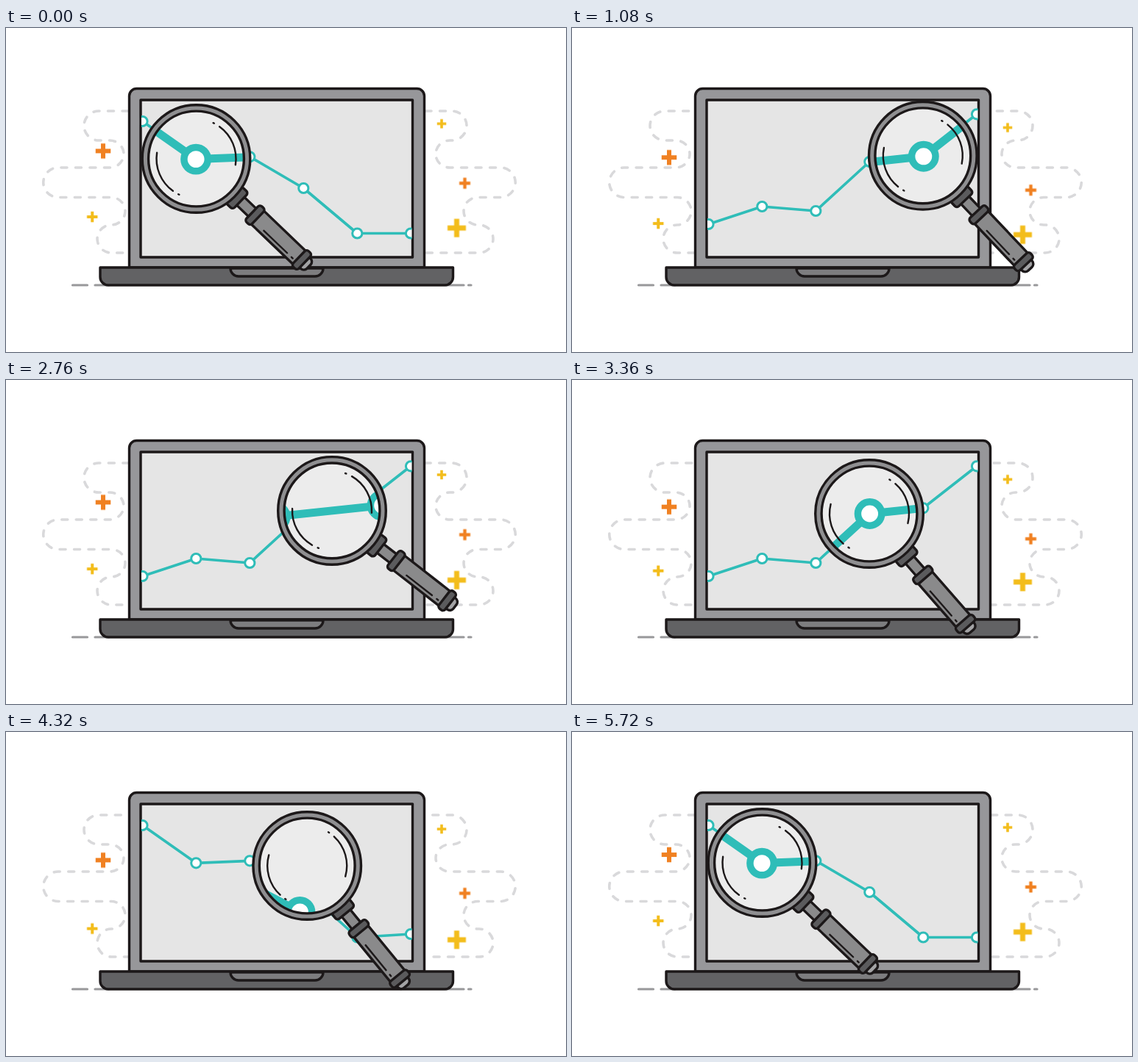
An HTML page that plays this animation: 761x441 px, repeating every 5.76 s.

```html
<!DOCTYPE html>
<html lang="en">
<head>
<meta charset="utf-8">
<title>Chart under a magnifier</title>
<style>
  html, body { margin: 0; width: 100%; height: 100%; overflow: hidden; background: #fff; }
  svg { display: block; width: 761px; height: 441px; }
  .ink { stroke: #1c1819; stroke-width: 3.4; stroke-linejoin: round; stroke-linecap: round; }
  .line { fill: none; }
  .trail { fill: none; stroke: #d9d9db; stroke-width: 3.6; stroke-linecap: round;
    stroke-dasharray: 8 11.5; animation: march 2880ms linear infinite; }
  .plus { animation: bob 1440ms cubic-bezier(.37, 0, .63, 1) infinite alternate; }
  .orange { stroke: #f08122; }
  .yellow { stroke: #f3bd1c; }
  .graph { stroke: #2fbdb8; stroke-width: 3.7; fill: none; stroke-linejoin: round; }
  .graph circle { fill: #fff; stroke-width: 3; }
  #zoom { stroke-width: 11; }
  #zoom circle { stroke-width: 9.5; }
  .metal { fill: #8a8a8b; }
  .collar { fill: #5b5b5d; }
  .thin { stroke-width: 2.4; }
  @keyframes march { to { stroke-dashoffset: -19.5; } }
  @keyframes bob { from { transform: translateY(-5.3px); } to { transform: translateY(5.3px); } }
</style>
</head>
<body>
<svg viewBox="0 0 761 441">
  <defs>
    <clipPath id="screenClip"><rect x="184" y="99" width="367.5" height="212"/></clipPath>
    <clipPath id="glassClip"><circle r="65"/></clipPath>
  </defs>

  <path class="trail" d="M166 113H126a20 20 0 0 0 0 40H141a19 18.5 0 0 1 0 37H71a20 20 0 0 0 0 40.5H143a19 18.75 0 0 1 0 37.5a19 19 0 0 0 0 38H166"/>
  <path class="trail" d="M570 113H606a20 20 0 0 1 0 40H603a19 18.5 0 0 0 0 37H672a20 20 0 0 1 0 40.5H641a19 18.75 0 0 0 0 37.5H643a19 19 0 0 1 0 38H570"/>
  <g id="pluses"></g>

  <!-- laptop -->
  <path d="M90.500 350H110.500M121 350H140M598 350H622M628.500 350H632" fill="none" stroke="#98989a" stroke-width="3.2" stroke-linecap="round"/>
  <path class="ink" fill="#97979a" d="M167.500 326V92.500a10 10 0 0 1 10-10H558.500a10 10 0 0 1 10 10V326z"/>
  <rect class="ink" x="183" y="98" width="369.500" height="214" fill="#e5e5e5"/>
  <path class="ink" fill="#626264" d="M128 326H607.500V339a11 11 0 0 1-11 11H139a11 11 0 0 1-11-11z"/>
  <path class="ink" fill="#7d7d7f" d="M305 327a11 11 0 0 0 11 11H420a11 11 0 0 0 11-11z"/>

  <g class="graph" id="chart" clip-path="url(#screenClip)"></g>

  <g id="lens">
    <g id="handle">
      <rect class="ink metal" x="80" y="-7.500" width="30" height="15"/>
      <rect class="ink collar" x="70" y="-15.500" width="13.500" height="31" rx="4"/>
      <path class="ink" fill="#a3a3a5" d="M203 -9.500H206a6 6 0 0 1 6 6V3.500a6 6 0 0 1-6 6H203z"/>
      <rect class="ink metal" x="114" y="-12.500" width="82" height="25"/>
      <rect class="ink collar" x="105.500" y="-15" width="10.500" height="30" rx="4"/>
      <rect class="ink collar" x="193.500" y="-15" width="10.500" height="30" rx="4"/>
      <path class="ink line thin" d="M134 7H178M186 7H188.500"/>
    </g>
    <circle r="65" fill="#ececec"/>
    <g class="graph" id="zoom" clip-path="url(#glassClip)"></g>
    <g id="glare"></g>
    <circle r="69" fill="none" stroke="#8f8f91" stroke-width="9"/>
    <circle class="ink line" r="73.300"/>
    <circle class="ink line" r="64.900"/>
  </g>
</svg>

<script>
const LOOP = 5760;
const $ = id => document.getElementById(id);

function add(parent, tag, attrs) {
  const el = document.createElementNS('http://www.w3.org/2000/svg', tag);
  for (const key in attrs) el.setAttribute(key, attrs[key]);
  return parent.appendChild(el);
}

// x, middle y, size, thickness, colour, time of the lowest point
const pluses = [
  [132, 170.9, 20.5, 6, 'orange', 1050],
  [117.2, 262.3, 14.5, 4, 'yellow', 1435],
  [592, 131.2, 12.5, 3.6, 'yellow', 800],
  [623.5, 215.4, 15, 4.4, 'orange', 1130],
  [612.5, 277.5, 25, 7, 'yellow', 1435]
];
for (const [x, y, size, width, color, low] of pluses) {
  const spot = add($('pluses'), 'g', { transform: `translate(${x} ${y})` });
  add(spot, 'path', {
    class: `plus ${color}`, 'stroke-width': width,
    d: `M${-size / 2} 0h${size}M0 ${-size / 2}v${size}`,
    style: `animation-delay:${low - 1440}ms`
  });
}

const polar = deg => {
  const a = deg * Math.PI / 180;
  return `${54 * Math.cos(a)} ${54 * Math.sin(a)}`;
};
const arc = (from, to) => `M${polar(from)}A54 54 0 0 1 ${polar(to)}`;
for (const turn of [0, 180]) {
  add($('glare'), 'path', {
    class: 'ink line thin',
    d: arc(82, 145) + arc(71.5, 73),
    transform: `rotate(${turn})`
  });
}

const xs = [185.5, 258.3, 331.3, 404.3, 477.3, 550];
const falling = [127, 178.3, 175.3, 218, 279.5, 279.5];
const rising = [267, 243, 249, 182, 174.3, 117.3];
const riseStart = [75, 155, 230, 310, 390, 475];
const fallStart = [3600, 3680, 3760, 4037, 3970, 4012];

function makeGraph(parent, r) {
  const line = add(parent, 'polyline', {});
  const dots = xs.map(() => add(parent, 'circle', { r }));
  return points => {
    line.setAttribute('points', points.join(' '));
    points.forEach(([x, y], i) => {
      dots[i].setAttribute('cx', x);
      dots[i].setAttribute('cy', y);
    });
  };
}
const drawChart = makeGraph($('chart'), 6.6);
const drawZoom = makeGraph($('zoom'), 16.2);

const clamp = u => Math.min(1, Math.max(0, u));
const smooth = u => u * u * (3 - 2 * u);
const smoother = u => u * u * u * (10 - 15 * u + 6 * u * u);

// A short pull back, then a quick swing to 1
const swing = (ms, back) =>
  -back * smooth(clamp(ms / 130)) + (1 + back) * smoother(clamp((ms - 130) / 210));

function track(keys, t) {
  let [t0, v0] = keys[0];
  for (const [t1, v1] of keys) {
    if (t < t1) return t <= t0 ? v0 : v0 + (v1 - v0) * smooth((t - t0) / (t1 - t0));
    t0 = t1;
    v0 = v1;
  }
  return v0;
}

const lensX = [[380, 258.5], [520, 252.3], [960, 476.8], [2440, 476.8], [2560, 482],
  [2960, 404], [4180, 404], [4320, 409.2], [4750, 258.5]];
const lensY = [[520, 178], [960, 173.8], [2560, 173.8], [2960, 182], [4320, 182], [4750, 178]];
const tilt = [[380, 43.8], [520, 45.8], [740, 62], [940, 43.5], [1080, 46.6],
  [2440, 46.6], [2560, 48.5], [2760, 38], [2980, 50], [3200, 48.9],
  [4180, 48.9], [4320, 50.7], [4520, 36], [4680, 46], [4800, 43.8]];

function render(t) {
  const points = xs.map((x, i) => {
    const up = swing(t - riseStart[i], 0.15);
    const down = swing(t - fallStart[i], 0);
    return [x, falling[i] + (rising[i] - falling[i]) * (up - down)];
  });
  const cx = track(lensX, t), cy = track(lensY, t);
  const turn = `rotate(${track(tilt, t)})`;
  drawChart(points);
  drawZoom(points.map(([x, y]) => [2 * (x - cx), 2 * (y - cy)]));
  $('lens').setAttribute('transform', `translate(${cx} ${cy})`);
  $('handle').setAttribute('transform', turn);
  $('glare').setAttribute('transform', turn);
}

let start;
function tick(now) {
  start ??= now;
  render((now - start) % LOOP);
  requestAnimationFrame(tick);
}
render(0);
requestAnimationFrame(tick);
</script>
</body>
</html>
```
